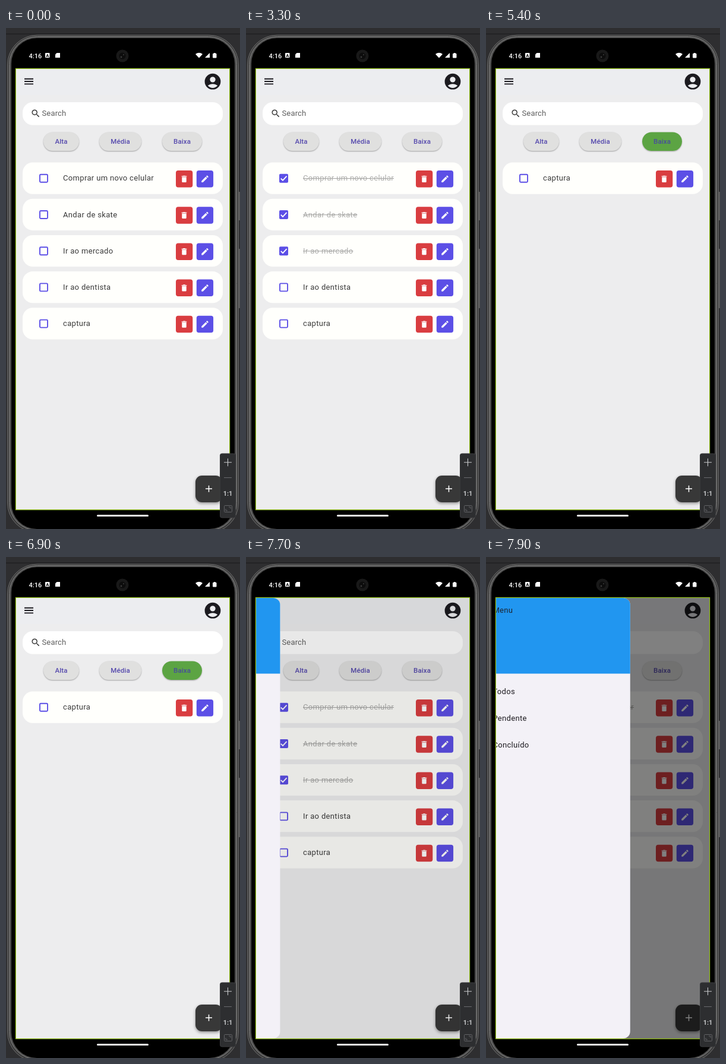
Recreate the animation shown at these times as an HTML page with a canvas. Size 394 px wide and 844 px high, loop 8000 ms.

```html
<!DOCTYPE html>
<html lang="pt">
<head>
<meta charset="utf-8">
<title>Tarefas</title>
<style>
  html, body { margin: 0; width: 100%; height: 100%; overflow: hidden; background: #2e2e30; }
  canvas { display: block; width: 394px; height: 844px; }
</style>
</head>
<body>
<canvas id="stage"></canvas>
<script>
const W = 394, H = 844, LOOP = 8000, STEP = 100;
const canvas = document.getElementById('stage');
const ctx = canvas.getContext('2d');
const dpr = window.devicePixelRatio || 1;
canvas.width = W * dpr;
canvas.height = H * dpr;

const PURPLE = '#5c4fe6', RED = '#d93d40', INK = '#1c1b20';
const SCREEN = { x: 17, y: 69, w: 359, h: 742 };
const ROW_TOP = 226.5, ROW_PITCH = 61.2;

const tasks = [
  { name: 'Comprar um novo celular', level: 0, press: 900, done: 1000, calm: 1400 },
  { name: 'Andar de skate', level: 0, press: 1400, done: 1500, calm: 1800 },
  { name: 'Ir ao mercado', level: 1, press: 2200, done: 2400, calm: 3100 },
  { name: 'Ir ao dentista', level: 1 },
  { name: 'captura', level: 2 }
];
const chips = [
  { name: 'Alta', x: 63, w: 60, color: '#f0564c', ink: '#6a3f86', on: 3500, off: 3900 },
  { name: 'Média', x: 157, w: 71, color: '#d9e450', ink: '#7a5547', on: 3900, off: 5200 },
  { name: 'Baixa', x: 263, w: 67, color: '#5ca443', ink: '#484c9c', on: 5200, off: 7100 }
];
const icons = {
  trash: new Path2D('M6 19c0 1.1.9 2 2 2h8c1.1 0 2-.9 2-2V7H6v12zM19 4h-3.5l-1-1h-5l-1 1H5v2h14V4z'),
  pencil: new Path2D('M3 17.25V21h3.75L17.81 9.94l-3.75-3.75L3 17.25zM20.71 7.04c.39-.39.39-1.02 0-1.41l-2.34-2.34c-.39-.39-1.02-.39-1.41 0l-1.83 1.83 3.75 3.75 1.83-1.83z'),
  person: new Path2D('M12 2a10 10 0 1 0 0 20a10 10 0 1 0 0-20zM12 6a3.5 3.5 0 1 1 0 7a3.5 3.5 0 1 1 0-7zM12 20c-2.03 0-4.43-.82-6.14-2.88C7.55 15.8 9.68 15 12 15s4.45.8 6.14 2.12C16.43 19.18 14.03 20 12 20z'),
  search: new Path2D('M15.5 14h-.79l-.28-.27A6.47 6.47 0 0 0 16 9.5 6.5 6.5 0 1 0 9.5 16c1.61 0 3.09-.59 4.23-1.57l.27.28v.79l5 4.99L20.49 19l-4.99-5zm-6 0C7.01 14 5 11.99 5 9.5S7.01 5 9.5 5 14 7.01 14 9.5 11.99 14 9.5 14z')
};

const clamp = v => Math.max(0, Math.min(1, v));

function box(x, y, w, h, r, fill, stroke, line = 1) {
  ctx.beginPath();
  ctx.roundRect(x, y, w, h, r);
  if (fill) { ctx.fillStyle = fill; ctx.fill(); }
  if (stroke) { ctx.strokeStyle = stroke; ctx.lineWidth = line; ctx.stroke(); }
}

function disc(x, y, r, fill) {
  ctx.beginPath();
  ctx.arc(x, y, r, 0, Math.PI * 2);
  ctx.fillStyle = fill;
  ctx.fill();
}

function lines(color, width, ...paths) {
  ctx.beginPath();
  for (const p of paths) {
    ctx.moveTo(p[0], p[1]);
    for (let i = 2; i < p.length; i += 2) ctx.lineTo(p[i], p[i + 1]);
  }
  ctx.strokeStyle = color;
  ctx.lineWidth = width;
  ctx.stroke();
}

function shape(color, ...pts) {
  ctx.beginPath();
  for (let i = 0; i < pts.length; i += 2) ctx.lineTo(pts[i], pts[i + 1]);
  ctx.fillStyle = color;
  ctx.fill();
}

function text(str, x, y, color, { size = 13, weight = 400, gap = 0.34, align = 'left' } = {}) {
  ctx.font = `${weight} ${size}px Roboto, sans-serif`;
  ctx.letterSpacing = gap + 'px';
  ctx.textAlign = align;
  ctx.fillStyle = color;
  ctx.fillText(str, x, y);
  return ctx.measureText(str).width;
}

function icon(path, cx, cy, scale, color) {
  ctx.save();
  ctx.translate(cx - 12 * scale, cy - 12 * scale);
  ctx.scale(scale, scale);
  ctx.fillStyle = color;
  ctx.fill(path, 'evenodd');
  ctx.restore();
}

function shadowed(color, blur, dy, draw) {
  ctx.save();
  ctx.shadowColor = color;
  ctx.shadowBlur = blur * dpr;
  ctx.shadowOffsetY = dy * dpr;
  draw();
  ctx.restore();
}

function drawPhone() {
  ctx.fillStyle = '#2e2e30';
  ctx.fillRect(0, 0, W, H);
  ctx.fillStyle = '#232325';
  ctx.fillRect(0, 9, W, 2);
  box(390, 276, 6, 48, 2, '#5b5b5b');
  box(390, 372, 6, 100, 2, '#5b5b5b');
  box(2.5, 12, 389, 838, 50, '#3b3b3b', '#6d6d6d');
  box(5.5, 14.5, 383, 832, 47, '#4d4d4d', '#858585');
  box(9, 17, 376, 827, 43, '#000');
  disc(196, 47, 10.5, '#191919');
  disc(196, 47, 5.5, '#0c0c0c');
  disc(194, 49, 1.4, '#3a3a3a');
  disc(198, 45, 1.2, '#303030');
  box(153, 820, 87, 3, 1.5, '#f4f4f4');
  box(16.5, 68.5, 360, 743, 0, null, '#97c31c', 1.4);
}

function drawStatus() {
  text('4:16', 38.5, 50.5, '#fff', { size: 11, weight: 500, gap: 0 });
  box(66, 42, 7.5, 8, 1, '#fff');
  text('A', 69.8, 49, '#000', { size: 7.5, weight: 700, gap: 0, align: 'center' });
  shape('#fff', 85.5, 42, 91, 42, 91, 50, 83, 50, 83, 44.5);
  ctx.beginPath();
  ctx.moveTo(325, 50.5);
  ctx.lineTo(319, 44);
  ctx.quadraticCurveTo(325, 39.5, 331, 44);
  ctx.fillStyle = '#fff';
  ctx.fill();
  shape('#fff', 343, 42, 343, 50, 335, 50);
  box(348, 43, 6.5, 7.5, 1, '#fff');
  box(349.8, 42, 3, 2, 0, '#fff');
}

function chipLevel(c, t) {
  return clamp((t - c.on + 100) / 200) * (t >= c.on) * (1 - clamp((t - c.off + 100) / 200) * (t >= c.off));
}

function drawChip(c, t) {
  const level = chipLevel(c, t);
  shadowed('rgba(0,0,0,.32)', 2, 1, () => box(c.x, 175.5, c.w, 31.5, 15.75, '#e0e0df'));
  ctx.globalAlpha = level;
  box(c.x, 175.5, c.w, 31.5, 15.75, c.color);
  ctx.globalAlpha = 1;
  text(c.name, c.x + c.w / 2, 195, level > 0.5 ? c.ink : '#5549ad',
    { size: 11.5, weight: 500, gap: 0.1, align: 'center' });
}

function drawTask(task, row, t) {
  const y = ROW_TOP + row * ROW_PITCH, mid = y + 26.8;
  box(28, y, 337, 53.2, 17, '#fffffc');

  if (t >= task.press && t < task.calm) {
    ctx.globalAlpha = 0.1 * clamp((t - task.press + 100) / 200) * clamp((task.calm - t) / 200);
    disc(63.5, mid, 15.5, PURPLE);
    ctx.globalAlpha = 1;
  }
  const done = t >= task.done;
  if (done) {
    box(56, mid - 7.5, 15, 15, 2, PURPLE);
    lines('#fff', 1.8, [58.7, mid + 0.2, 62, mid + 3.4, 68.5, mid - 3.6]);
  } else {
    box(57, mid - 6.5, 13, 13, 1.5, null, PURPLE, 1.9);
  }
  const width = text(task.name, 96, mid + 4, done ? '#aeaeac' : '#3b3b3b');
  if (done) lines('#a2a2a0', 1, [96, mid + 0.2, 96 + width, mid + 0.2]);

  box(286, mid - 13.3, 28.3, 28.5, 4, RED);
  box(320.8, mid - 13.3, 28.3, 28.5, 4, PURPLE);
  icon(icons.trash, 300, mid + 1, 0.62, '#fff');
  icon(icons.pencil, 335, mid + 1, 0.64, '#fff');
}

function drawPage(t) {
  const { x, y, w, h } = SCREEN;
  ctx.fillStyle = '#ededee';
  ctx.fillRect(x, y, w, h);
  ctx.fillStyle = '#ecedf0';
  ctx.fillRect(x, y, w, 44);
  lines(INK, 1.9, [31, 85.7, 46, 85.7], [31, 90, 46, 90], [31, 94.4, 46, 94.4]);
  icon(icons.person, 348, 90.2, 1.34, INK);

  box(28, 125, 337, 38.5, 17, '#fff');
  icon(icons.search, 50, 144, 0.73, '#3a3a3a');
  text('Search', 60.5, 148.3, '#5f5f5f', { gap: 0.15 });

  chips.forEach(c => drawChip(c, t));
  const active = chips.findIndex(c => t >= c.on && t < c.off);
  tasks.filter(k => active < 0 || k.level === active)
    .forEach((k, row) => drawTask(k, row, t));

  shadowed('rgba(0,0,0,.4)', 5, 2, () => box(319, 754, 45, 45, 11, '#383838'));
  lines('#fff', 1.5, [336, 776.3, 347, 776.3], [341.5, 770.8, 341.5, 781.8]);
}

// Critically damped spring opening the side menu.
function drawDrawer(t) {
  const s = Math.max(0, t - 7658) * 0.01735;
  if (!s) return;
  const open = 1 - (1 + s) * Math.exp(-s);
  const { x, y, w, h } = SCREEN, width = 245;
  const left = x + width * (open - 1);
  ctx.fillStyle = `rgba(0,0,0,${0.54 * open})`;
  ctx.fillRect(x, y, w, h);

  ctx.save();
  ctx.beginPath();
  ctx.roundRect(left, y, width, h, [0, 12, 12, 0]);
  ctx.clip();
  ctx.fillStyle = '#f3f1f7';
  ctx.fillRect(left, y, width, h);
  ctx.fillStyle = '#2196f0';
  ctx.fillRect(left, y, width, 127.5);
  text('Menu', left + 13.5, 94, '#1d2430');
  ['Todos', 'Pendente', 'Concluído'].forEach((item, i) =>
    text(item, left + 13.5, 230.5 + i * 45, '#1d1b20'));
  ctx.restore();
}

function drawToolbar() {
  box(360.5, 717, 26, 108, 3, '#2d2e30', '#3a3b3d');
  lines('#c9cacc', 1.1, [367, 731.7, 380, 731.7], [373.5, 725.2, 373.5, 738.2]);
  lines('#66676a', 1.1, [367, 757.5, 380, 757.5]);
  text('1:1', 373.5, 788, '#c4c5c7', { size: 11, weight: 700, gap: 0, align: 'center' });
  box(367.5, 804.5, 13, 11, 1, null, '#626366');
  lines('#626366', 1, [370, 810, 370, 813, 373, 813], [375, 807, 378, 807, 378, 810]);
}

function draw(t) {
  ctx.setTransform(dpr, 0, 0, dpr, 0, 0);
  drawPhone();
  drawStatus();
  ctx.save();
  ctx.beginPath();
  ctx.rect(SCREEN.x, SCREEN.y, SCREEN.w, SCREEN.h);
  ctx.clip();
  drawPage(t);
  drawDrawer(t);
  ctx.restore();
  drawToolbar();
}

function tick() {
  const t = (performance.now() + 10) % LOOP;
  draw(Math.floor(t / STEP) * STEP);
  requestAnimationFrame(tick);
}
tick();
</script>
</body>
</html>
```
